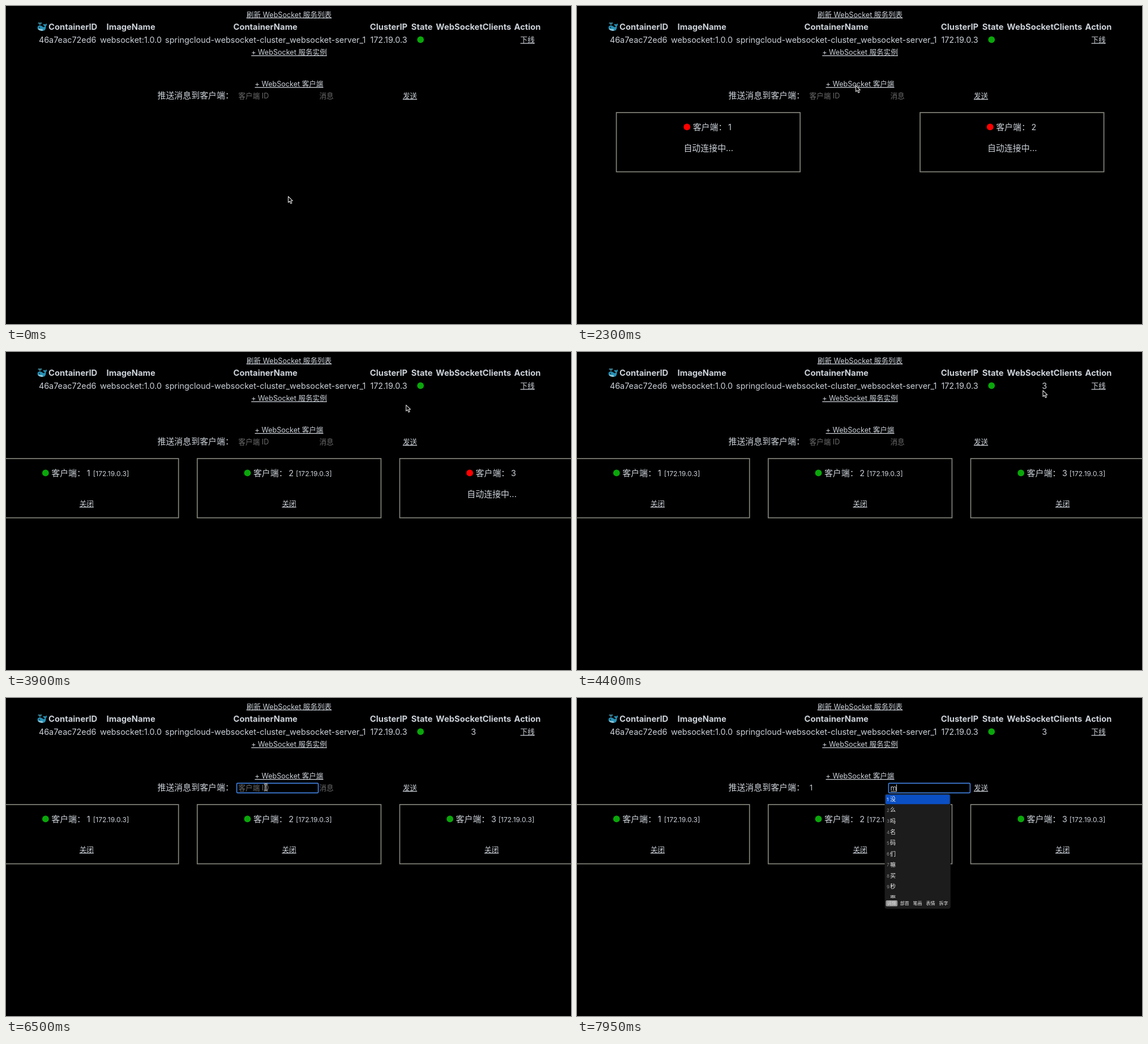
Animation, 998 px wide and 561 px high, one loop 8000 ms. Source, as an HTML page:

```html
<!DOCTYPE html>
<html lang="zh-CN">
<head>
<meta charset="utf-8">
<title>WebSocket</title>
<style>
  html, body { margin: 0; width: 100%; height: 100%; overflow: hidden; background: #000; }
  svg { display: block; width: 998px; height: 561px; }
  text { font: 14.4px Inter, "Noto Sans CJK SC", "Noto Sans CJK", sans-serif; fill: #cbd1d8; }
  .mid, .link { text-anchor: middle; }
  .head { font-size: 14.75px; font-weight: 700; }
  .cjk { font-size: 14.95px; }
  .small { font-size: 12.6px; }
  .hint { font-size: 12.6px; fill: #6c6c6c; }
  .ip { font-size: 12.1px; }
  .link { font-size: 12.6px; text-decoration: underline 1px; text-underline-offset: 1.5px; text-decoration-skip-ink: none; }
  .pick { font-size: 10px; font-weight: 500; fill: #f0f0f0; }
  .num { font-size: 8px; fill: #8a8a8a; }
  .tab { font-size: 8px; fill: #e8e8e8; text-anchor: middle; }
</style>
</head>
<body>
<svg viewBox="0 0 998 561" lang="zh-CN">
  <g id="page"></g>
  <g id="live"></g>
</svg>
<script>
const LOOP = 8000, STEP = 50;
const GREEN = '#0aa60a', RED = '#ff0000';

const text = (x, y, s, cls = '') => `<text x="${x}" y="${y}" class="${cls}">${s}</text>`;
const rect = (x, y, w, h, attrs) => `<rect x="${x}" y="${y}" width="${w}" height="${h}" ${attrs}/>`;
const dot = (x, y, color) => `<circle cx="${x}" cy="${y}" r="5.9" fill="${color}"/>`;

// Times at which each client is added, connects and learns its server address
const clients = [
  { added: 950, open: 2900, ip: 3550 },
  { added: 1700, open: 3650, ip: 3650 },
  { added: 2450, open: 4350, ip: 4350 },
];
const COUNT_AT = 4350, FOCUS_ID = 6250, TYPE_ID = 7000, FOCUS_MSG = 7550, TYPE_MSG = 7750;

// time, x, y of the pointer
const pointer = [
  [0, 498.5, 336], [100, 498.5, 336], [800, 492.5, 140.5], [3450, 492.5, 140.5],
  [4200, 823, 68], [5050, 823, 68], [5950, 459, 157.5], [LOOP, 459, 157.5],
];

const whale = `<g transform="translate(55 28)">
  <path d="M.6 9.6Q1 6.4 5 6.4Q8.6 6.6 10.6 9Q13 10.2 13.4 7.4Q10.6 6.6 10.8 4Q13 3.4 14.2 5Q14.8 2.8 16.9 3Q17.6 6 15.4 7.5Q16.4 15.8 8.6 16Q.4 15.6 .6 9.6Z" fill="#2690b5"/>
  <path d="M1 11.6Q5 13.6 9 12.4Q11 14 9.6 15.7Q2.4 16 1 11.6Z" fill="#9cc9d6"/>
  <path d="M5 6V3.2M5 3.2Q3.6 .6 1.8 2.8M5 3.2Q6.4 .6 8.2 2.8" fill="none" stroke="#58bfdc" stroke-width="1.2"/>
  <circle cx="4.2" cy="10" r=".9" fill="#06202b"/></g>`;

const headers = [[118.2, 'ContainerID'], [220.7, 'ImageName'], [458.2, 'ContainerName'], [676, 'ClusterIP'],
  [734.7, 'State'], [825.8, 'WebSocketClients'], [921, 'Action']];
const cells = [[108.7, '46a7eac72ed6'], [220.5, 'websocket:1.0.0'],
  [458.2, 'springcloud-websocket-cluster_websocket-server_1'], [676, '172.19.0.3']];
const links = [[500, 19.5, '刷新 WebSocket 服务列表'], [921.2, 64.3, '下线'], [500, 86, '+ WebSocket 服务实例'],
  [500, 142, '+ WebSocket 客户端'], [713.5, 163, '发送']];

document.getElementById('page').innerHTML = whale
  + headers.map(([x, s]) => text(x, 42.2, s, 'mid head')).join('')
  + cells.map(([x, s]) => text(x, 65, s, 'mid')).join('')
  + links.map(([x, y, s]) => text(x, y, s, 'link')).join('')
  + dot(732.2, 59.3, GREEN)
  + text(267.5, 163.3, '推送消息到客户端：', 'cjk');

function clientCard(client, i, n, t) {
  const c = 500 + 1073 * ((2 * i + 1) / (2 * n) - 0.5);
  const open = t >= client.open, ip = t >= client.ip;
  const x = c - (ip ? 72.5 : 37.5) - (i ? 1 : 0);
  return rect(c - 162.2, 188, 324.6, 104.5, 'fill="none" stroke="#83837b" stroke-width="1.7"')
    + dot(x, 213.4, open ? GREEN : RED)
    + text(x + 10.4, 219.2, '客户端：', 'cjk')
    + text(x + 72.8, 219, i + 1)
    + (ip ? text(x + (i ? 85.5 : 84), 219, '[172.19.0.3]', 'ip') : '')
    + (open ? text(c, 272, '关闭', 'link') : text(c + 0.5, 255.8, '自动连接中...', 'mid cjk'));
}

const focusRing = x => rect(x, 150.4, 144, 16.9, 'rx="1.5" fill="none" stroke="#3f7fdc" stroke-width="1.7"');

function fields(t) {
  let s = t < TYPE_ID ? text(410.5, 162.6, '客户端 ID', 'hint') : text(411, 162.6, '1', 'small');
  s += t < TYPE_MSG ? text(553.5, 162.6, '消息', 'hint')
    : text(553.5, 162.6, 'm', 'small') + rect(554, 164.3, 10, 1, 'fill="#cbd1d8"') + rect(564, 152.5, 1, 12.5, 'fill="#cbd1d8"');
  if (t >= FOCUS_MSG) s += focusRing(550.4);
  else if (t >= FOCUS_ID) s += focusRing(407.6);
  return s;
}

function candidates() {
  const rows = [...'没么吗名码们嘛买秒面'].map((ch, i) => {
    const y = 182.2 + 19.28 * i;
    const num = i < 9 ? `<text x="547" y="${y - 0.4}" class="num"${i ? '' : ' style="fill:#e4ecff"'}>${i + 1}</text>` : '';
    return num + text(553, y, ch, 'pick');
  }).join('');
  const tabs = ['词频', '部首', '笔画', '表情', '拆字']
    .map((s, i) => text(555.8 + 22.9 * i, 365.4, s, 'tab')).join('');
  return rect(543.5, 169, 116.3, 202.8, 'rx="4" fill="#1c1c1c"')
    + rect(545, 170.5, 113.5, 16.8, 'rx="2" fill="#0a4fc4"') + rows
    + rect(544, 353, 115.3, 18, 'rx="3" fill="#1c1c1c"')
    + rect(545.4, 357, 20.8, 10.6, 'rx="2" fill="#949494"') + tabs;
}

function pointerAt(t) {
  const k = pointer.findIndex(p => p[0] > t);
  const [t0, x0, y0] = pointer[k - 1], [t1, x1, y1] = pointer[k];
  const u = (t - t0) / (t1 - t0), e = u * u * (3 - 2 * u);
  return [x0 + (x1 - x0) * e, y0 + (y1 - y0) * e];
}

function cursor(t) {
  if (t >= TYPE_ID) return '';
  const [x, y] = pointerAt(t);
  const overField = x > 407 && x < 552 && y > 150 && y < 168;
  const beam = 'M-3.2-6Q-.6-6 0-4.6Q.6-6 3.2-6M0-4.6V4.6M-3.2 6Q-.6 6 0 4.6Q.6 6 3.2 6M-1.6 1.6H1.6';
  const shape = overField
    ? `<path d="${beam}" fill="none" stroke="#ddd" stroke-width="2.4"/><path d="${beam}" fill="none" stroke="#111" stroke-width=".9"/>`
    : '<path d="M0 0V10.6L2.5 8.3L4.4 12.6L6.4 11.8L4.5 7.7H7.8Z" fill="#000" stroke="#ddd" stroke-width="1.1" stroke-linejoin="round"/>';
  return `<g transform="translate(${x} ${y})">${shape}</g>`;
}

function scene(t) {
  const shown = clients.filter(c => t >= c.added);
  return shown.map((c, i) => clientCard(c, i, shown.length, t)).join('')
    + (t >= COUNT_AT ? text(825.8, 65, '3', 'mid') : '')
    + fields(t)
    + (t >= TYPE_MSG ? candidates() : '')
    + cursor(t);
}

const live = document.getElementById('live');
const start = performance.now();
let last = -1;
function frame() {
  const t = Math.floor(((performance.now() - start) % LOOP) / STEP) * STEP;
  if (t !== last) live.innerHTML = scene(last = t);
  requestAnimationFrame(frame);
}
frame();
</script>
</body>
</html>
```
